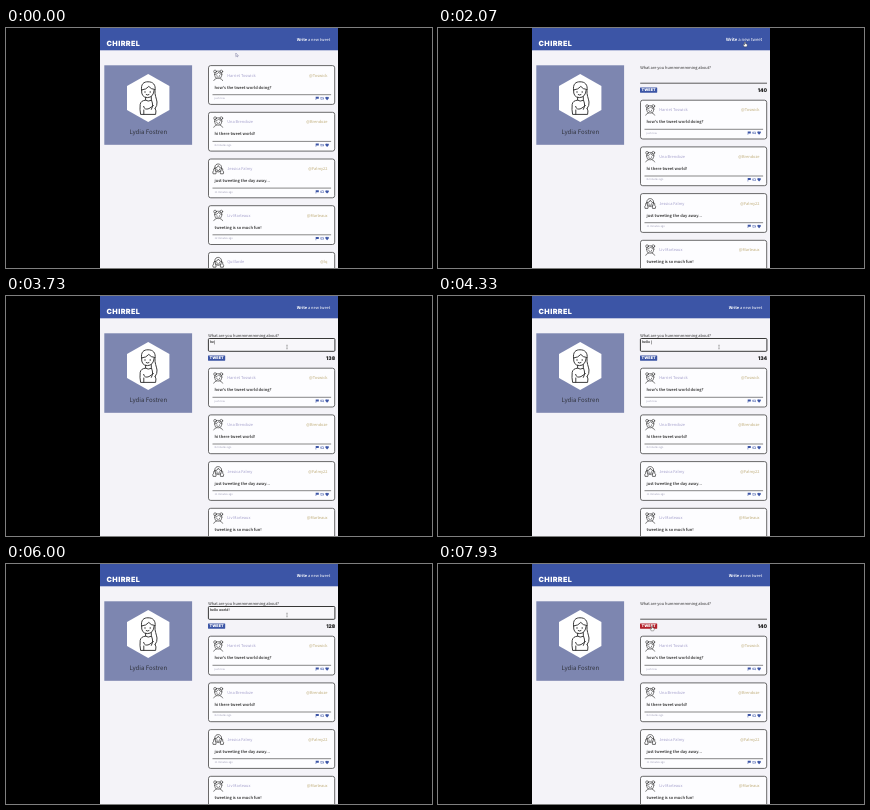
These frames come from a looping animation (426x240 px, 8 s). An HTML page:

```html
<!DOCTYPE html>
<html lang="en">
<head>
<meta charset="utf-8">
<title>Short messages</title>
<style>
  html, body { margin: 0; width: 100%; height: 100%; overflow: hidden; background: #000; }
  svg { display: block; }
  #stage { width: 100vw; height: 100vh; }
  text {
    font-family: "Noto Sans CJK JP", "Noto Sans CJK SC", "Noto Sans", sans-serif;
    font-size: 3.94px; text-rendering: geometricPrecision; white-space: pre;
  }
  .heavy { font-family: Inter, "Open Sans", sans-serif; font-weight: 900; }
  .bold { font-weight: 700; }
  .end { text-anchor: end; }
  .mid { text-anchor: middle; }
  .line { fill: none; stroke: #333; stroke-linecap: round; stroke-linejoin: round; }
</style>
</head>
<body>
<svg id="stage" viewBox="0 0 426 240">
  <defs>
    <clipPath id="page"><rect x="94" width="238" height="240"/></clipPath>
    <clipPath id="slot"><rect id="slotBox" x="196" y="34" width="136" height="0"/></clipPath>
    <g id="buns" class="line" stroke-width=".6">
      <circle cx="-3" cy="-3.7" r="1.4"/>
      <circle cx="3.2" cy="-3.7" r="1.4"/>
      <path d="M-3.6-.6C-3.8-5.4 4-5.4 3.8-.6Q3.8 3.4.1 3.4Q-3.6 3.4-3.6-.6Q-.6-.8.6-3Q1.6-.8 3.8-.6"/>
      <path d="M-4.4 5.4Q-3.8 3.6-1.6 3.2M4.6 5.4Q4 3.6 1.8 3.2M-1.2.4v.4M1.4.4v.4M-.7 1.9Q.1 2.4.9 1.9"/>
    </g>
    <g id="curls" class="line" stroke-width=".7">
      <path d="M-3.2-.2C-4.6-6.2 4.6-6.2 3.4-.2M-3.2-.2Q-.4-.8.2-3Q1.2-.8 3.4-.2Q3.4 3.4.1 3.4Q-3.2 3.4-3.2-.2"/>
      <path d="M-3.2-.8Q-5.2 0-4.4 2Q-6 3.2-5 5.2H-2.2Q-1.6 4-2.4 2.6M3.4-.8Q5.4 0 4.6 2Q6.2 3.2 5.2 5.2H2.4Q1.8 4 2.6 2.6M-1.2.6v.4M1.4.6v.4M-.6 2h1.4"/>
    </g>
  </defs>
  <g clip-path="url(#page)">
    <rect x="94" width="238" height="240" fill="#f4f3f8"/>
    <rect x="94" width="238" height="22.3" fill="#3c55a6"/>
    <text class="heavy" x="100.6" y="17.5" fill="#fff" style="font-size:7.2px;letter-spacing:.4px">CHIRREL</text>
    <text id="write" class="end" x="324.2" y="12.5" fill="#fff"><tspan class="bold">Write</tspan> a new tweet</text>

    <rect x="98.3" y="37.3" width="87.8" height="79.5" fill="#7d86b0"/>
    <path d="M142.2 46L163.4 58V82L142.2 94L121 82V58Z" fill="#fff"/>
    <g class="line" stroke-width=".95">
      <path d="M135.6 62C134.6 56 138 53.6 142 53.8C147 53.6 150 57 149 62.4C148.6 67 150.4 70 151 74Q151.4 77.6 149.2 80.4M135.6 62Q140.4 61.6 142.8 58.4Q144.6 61.2 148.9 61.6"/>
      <path d="M135.6 62Q135 69.4 141.4 69.6Q147.4 69.6 148.2 62M139 63.6v.8M144.2 63.6v.8M140.2 66.6Q141.6 67.6 143 66.6"/>
      <path d="M139.6 69.4V72.2Q134.8 72.6 134.2 76.4Q133.6 81.4 134.6 86.4H149.6Q150.6 82.6 149.2 80.4M145.2 68.6Q145 72 146.4 75Q147.4 78 145.4 81.4M139.6 72.2Q142 74 145.2 72.4"/>
      <path d="M137.6 78.4Q138.4 82.4 143 80.6L147.4 77.6M137.8 82V86.4"/>
    </g>
    <text class="mid" x="142.3" y="106.4" fill="#30333c" style="font-size:6.1px">Lydia Fostren</text>

    <g clip-path="url(#slot)">
      <g id="form">
        <text x="202.2" y="41.4" fill="#333">What are you hummmmmming about?</text>
        <path id="rule" d="M202.2 55.2H329" stroke="#333" stroke-width=".8"/>
        <rect id="box" x="202.4" y="42.5" width="126.5" height="12.8" rx="1" fill="#f8f7fa" stroke="#222" stroke-width=".9"/>
        <text id="typed" class="bold" x="204" y="47.4" fill="#333" style="font-size:3.3px"></text>
        <rect id="caret" y="44.4" width=".4" height="4" fill="#222"/>
        <rect id="button" x="202" y="59.4" width="17.2" height="5.3" rx=".4"/>
        <text class="heavy mid" x="210.6" y="63.4" fill="#fff" style="font-size:3.8px">TWEET</text>
        <text id="count" class="heavy end" x="329.2" y="63.9" fill="#222" style="font-size:5.1px"></text>
      </g>
    </g>
    <g id="cards"></g>
    <g id="cursor" stroke-linejoin="round">
      <path id="arrow" d="M0 0V3.6L.9 2.8L1.5 4L2 3.8L1.5 2.7H2.6Z" fill="#fff" stroke="#77779c" stroke-width=".5"/>
      <path id="hand" d="M-.5 0Q0-.6.5 0V1.7L2.2 2.2V3.7L1.6 4.8H-.8L-2 2.8L-1.4 2.4L-.5 3Z" fill="#fff" stroke="#333" stroke-width=".4"/>
      <path id="beam" d="M-.7-1.8H.7M0-1.8V1.8M-.7 1.8H.7" fill="none" stroke="#666" stroke-width=".45"/>
    </g>
  </g>
</svg>
<script>
const LOOP = 8000, SHIFT = 34.6, PITCH = 46.7, LIMIT = 140;
const MESSAGE = "hello world!";
const OPEN = 1500, FOCUS = 3000, BLUR = 7750, CLEAR = 7850;
const $ = id => document.getElementById(id);
const show = (id, on) => $(id).setAttribute("visibility", on ? "inherit" : "hidden");

const posts = [
  ["Harriet Toswick", "@Toswick", "how's the tweet world doing?", "just now", "buns"],
  ["Una Brendoze", "@Brendoze", "hi there tweet world!", "8 minutes ago", "buns"],
  ["Jessica Falmy", "@Falmy22", "just tweeting the day away...", "11 minutes ago", "curls"],
  ["Liv Marteaux", "@Marteaux", "tweeting is so much fun!", "12 minutes ago", "buns"],
  ["Quillarde", "@lq", "thinking, as always", "an hour ago", "curls"]
];

const card = ([name, handle, body, age, face], i) => `
  <g transform="translate(202.5 ${37.6 + i * PITCH})">
    <rect width="126.2" height="38.8" rx="2.2" fill="#fdfdff" stroke="#3a3a3a" stroke-width=".75"/>
    <use href="#${face}" x="9.6" y="9.6"/>
    <text x="18.7" y="11" fill="#a5a1cc">${name}</text>
    <text class="end" x="119" y="11" fill="#bfac78">${handle}</text>
    <text class="bold" x="6" y="23" fill="#444">${body}</text>
    <path d="M4 29.1H122.6" stroke="#555" stroke-width=".7"/>
    <text x="6" y="33.6" fill="#9d9cb4" style="font-size:2.6px">${age}</text>
    <g fill="#3c55a6">
      <path d="M107.2 31.2h3.1v2h-2.6v1.3h-.5z"/>
      <path d="M111.6 32.5l.9-1.1.9 1.1h-.6v.9h1l.5.5h-2.2v-1.4zM115.6 33l-.9 1.1-.9-1.1h.6v-.9h-1l-.5-.5h2.2v1.4z" opacity=".8"/>
      <path d="M118.6 34.6L117 32.9C116.3 31.4 117.9 30.5 118.6 31.7C119.3 30.5 120.9 31.4 120.2 32.9Z"/>
    </g>
  </g>`;
$("cards").innerHTML = posts.map(card).join("");

// time, x, y
const path = [
  [0, 229.8, 25], [100, 229.8, 25], [900, 304, 28.6], [1250, 307, 14], [2250, 307, 14],
  [2850, 281, 51], [6300, 281, 51], [7000, 225, 64], [7350, 214, 62], [LOOP, 214, 62]
];
const ease = p => 0.5 - Math.cos(Math.PI * Math.min(1, Math.max(0, p))) / 2;

function pointer(t) {
  const i = path.findIndex((k, n) => n && t <= k[0]);
  const [t0, x0, y0] = path[i - 1], [t1, x1, y1] = path[i];
  const p = ease((t - t0) / (t1 - t0));
  return [x0 + (x1 - x0) * p, y0 + (y1 - y0) * p];
}

const keyTime = i => i < 11 ? 3480 + i * 142 : 5240;
const typedAt = t => t < CLEAR ? [...MESSAGE].filter((c, i) => t >= keyTime(i)).length : 0;

function draw(t) {
  const drop = SHIFT * ease((t - OPEN) / 400);
  $("cards").setAttribute("transform", `translate(0 ${drop})`);
  $("slotBox").setAttribute("height", drop);
  show("form", drop > 0);

  const focus = t >= FOCUS && t < BLUR;
  show("box", focus);
  show("rule", !focus);
  const n = typedAt(t);
  $("typed").textContent = MESSAGE.slice(0, n);
  $("count").textContent = LIMIT - n;
  const lastKey = n ? keyTime(n - 1) : FOCUS;
  show("caret", focus && (t - lastKey) % 1060 < 530);
  $("caret").setAttribute("x", 204.2 + (n ? $("typed").getComputedTextLength() : 0));

  const [x, y] = pointer(t);
  const onLink = x > 288 && y < 17;
  const onButton = t > OPEN && x < 219.2 && y > 59 && y < 65;
  const onBox = t > OPEN + 400 && x > 202 && y > 42 && y < 55.5;
  $("write").style.fontSize = (onLink ? 4.25 : 3.94) + "px";
  $("button").setAttribute("fill", onButton ? "#b3202c" : "#3c55a6");
  $("cursor").setAttribute("transform", `translate(${x} ${y})`);
  show("hand", onLink || onButton);
  show("beam", onBox);
  show("arrow", !(onLink || onButton || onBox));
}

const start = performance.now();
function tick() {
  draw((performance.now() - start) % LOOP);
  requestAnimationFrame(tick);
}
tick();
</script>
</body>
</html>
```
